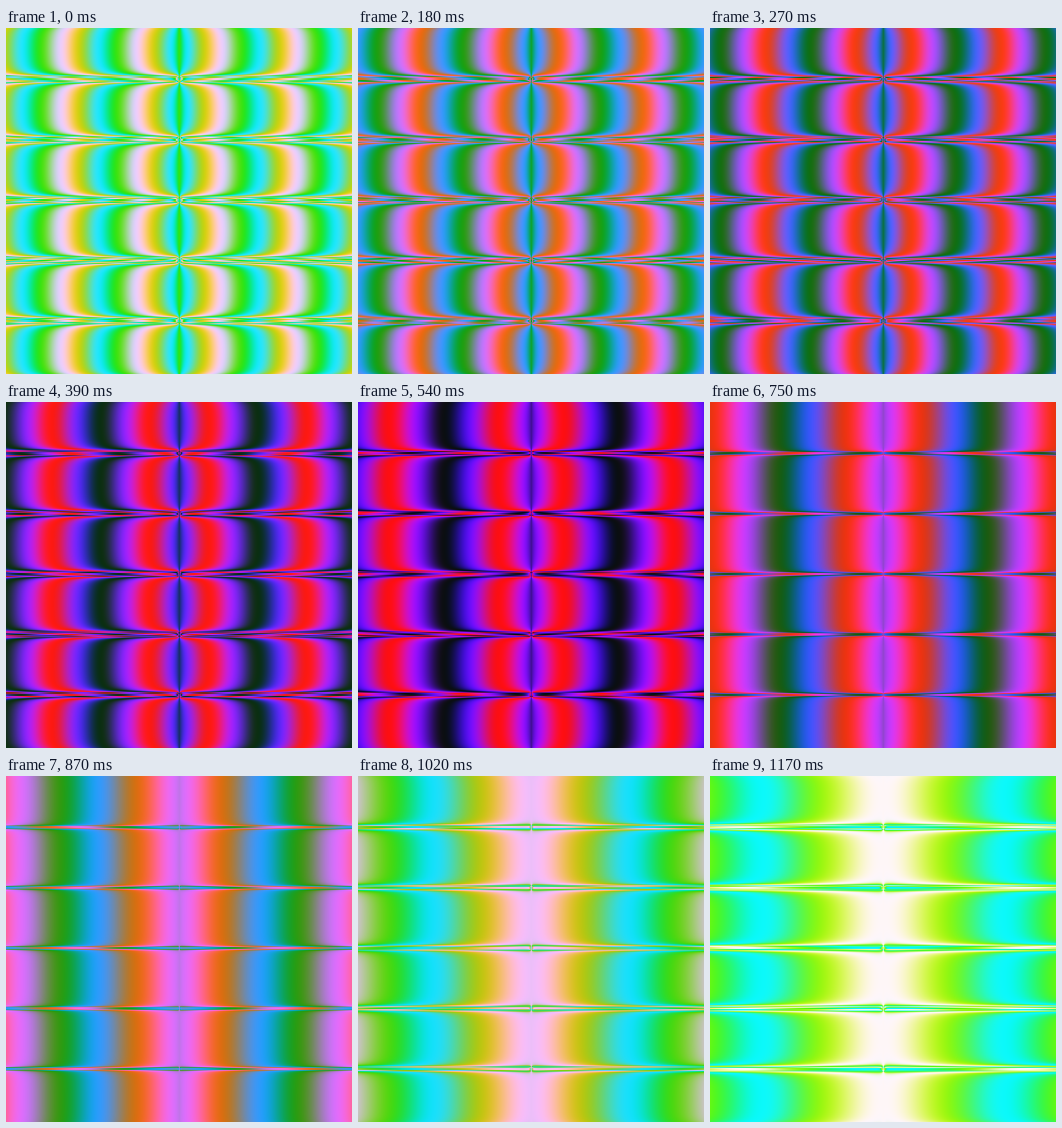
These frames come from a looping animation (512 px wide and 512 px high, 1.2 s). An HTML page with a canvas:

```html
<!DOCTYPE html>
<html lang="en">
<head>
<meta charset="utf-8">
<title>Pinched waves</title>
<style>
  html, body { margin: 0; width: 100%; height: 100%; overflow: hidden; background: #000; }
  canvas { display: block; width: 512px; height: 512px; }
</style>
</head>
<body>
<canvas id="stage" width="512" height="512"></canvas>
<script>
const SIZE = 512, HALF = SIZE / 2, STEP = 30, STEPS = 40;
const UNIT = SIZE / 18;      // pixels per radian
const LINE_Y = 254.1;        // one of the singular rows
const CORE = 8;              // half width of the bend along the axis

const ctx = document.getElementById('stage').getContext('2d');
const image = ctx.createImageData(SIZE, SIZE);
const data = image.data.fill(255);

// Fixed geometry: pinch of each row, and the bend at each distance from the axis
const rowSin = Float64Array.from({ length: SIZE }, (_, y) =>
  Math.max(Math.abs(Math.sin((y - LINE_Y) / UNIT)), 0.05));
const pinch = rowSin.map(s => 1 / (s * s) - 1);
const bend = new Float32Array(SIZE * (HALF + 1));
for (let y = 0, i = 0; y < SIZE; y++) {
  for (let d = 0; d <= HALF; d++) bend[i++] = Math.atan(d / (CORE * rowSin[y]));
}

function plot(x, y, r, g, b) {
  const i = 4 * (y * SIZE + x);
  data[i] = r;
  data[i + 1] = g;
  data[i + 2] = b;
}

function draw(n) {
  const slope = 0.0555 - 0.00095 * n;
  const swirl = 0.022 * (32 - n);
  const squeeze = 0.003 * (27 - n);
  const redShift = 2.31 + 0.1005 * n;
  const blueShift = -2.9 + 0.08 * n;
  const turn = Math.PI * (n - 17.5) / 23;
  const green = 132 - 118 * Math.cos(turn);
  const tint = 32 * Math.sin(turn) ** 2;

  for (let y = 0, i = 0; y < SIZE; y++) {
    const gain = swirl + squeeze * pinch[y];
    for (let d = 0; d <= HALF; d++) {
      const phase = slope * d + gain * bend[i++];
      const red = Math.cos(phase + redShift);
      const r = 132 + 122 * red;
      const g = green - tint * red;
      const b = 134 + 116 * Math.cos(2 * phase + blueShift);
      plot(HALF - d, y, r, g, b);
      if (d < HALF) plot(HALF + d, y, r, g, b);
    }
  }
  ctx.putImageData(image, 0, 0);
}

const start = performance.now();
let shown = 0;
draw(0);

function tick() {
  const n = Math.floor((performance.now() - start) / STEP) % STEPS;
  if (n !== shown) draw(shown = n);
  requestAnimationFrame(tick);
}
requestAnimationFrame(tick);
</script>
</body>
</html>
```
